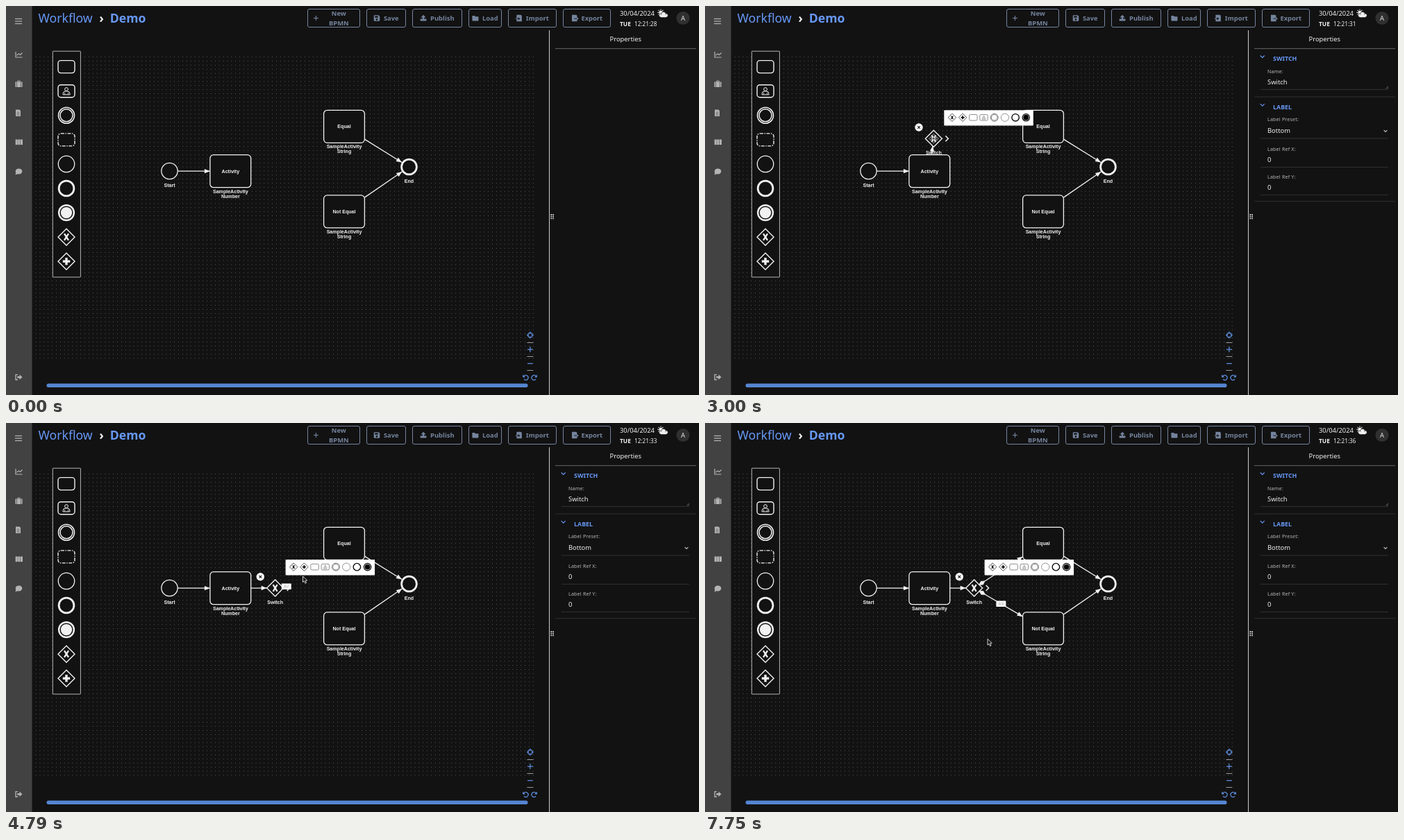
Recreate the animation shown at these times as an HTML page with a canvas. Size 998 by 561 pixels, loop 8000 ms.

```html
<!DOCTYPE html>
<html lang="en">
<head>
<meta charset="utf-8">
<title>Workflow editor</title>
<style>
html, body { margin: 0; width: 100%; height: 100%; overflow: hidden; background: #121212; }
canvas { display: block; }
</style>
</head>
<body>
<canvas id="stage" width="998" height="561"></canvas>
<script>
const W = 998, H = 561, LOOP = 8000, TURN = Math.PI * 2;
const BG = '#121212', INK = '#f1f1f1', BLUE = '#6798f5', SLATE = '#75849e', SIDE = '#b4b4b4', RAIL = '#424242';
const UI = '"Noto Sans", sans-serif', NODE = '"Liberation Sans", Arial, sans-serif';
const view = document.getElementById('stage').getContext('2d');
const backdrop = document.createElement('canvas');
backdrop.width = W;
backdrop.height = H;
let g = backdrop.getContext('2d');

// Drawing helpers
function paint(fill, stroke, width = 1) {
  if (fill) { g.fillStyle = fill; g.fill(); }
  if (stroke) { g.strokeStyle = stroke; g.lineWidth = width; g.stroke(); }
}
function trace(points, close) {
  g.beginPath();
  for (let i = 0; i < points.length; i += 2) g.lineTo(points[i], points[i + 1]);
  if (close) g.closePath();
}
function line(color, width, ...points) { trace(points); paint(null, color, width); }
function poly(fill, stroke, width, ...points) { trace(points, true); paint(fill, stroke, width); }
function circle(x, y, r, fill, stroke, width) {
  g.beginPath();
  g.arc(x, y, r, 0, TURN);
  paint(fill, stroke, width);
}
function box(x, y, w, h, r, fill, stroke, width) {
  g.beginPath();
  g.roundRect(x, y, w, h, r);
  paint(fill, stroke, width);
}
function boxAt(x, y, w, h, ...style) { box(x - w / 2, y - h / 2, w, h, ...style); }
function plus(x, y, r, color, width) {
  line(color, width, x - r, y, x + r, y);
  line(color, width, x, y - r, x, y + r);
}
function cross(x, y, rx, ry, color, width) {
  line(color, width, x - rx, y - ry, x + rx, y + ry);
  line(color, width, x + rx, y - ry, x - rx, y + ry);
}
function text(s, x, y, size, color, align = 'left', weight = 400, family = UI) {
  g.font = `${weight} ${size}px ${family}`;
  g.textAlign = align;
  g.fillStyle = color;
  g.fillText(s, x, y);
}
function at(x, y, draw, sx = 1, sy = sx, turn = 0) {
  g.save();
  g.translate(x, y);
  g.scale(sx, sy);
  g.rotate(turn);
  draw();
  g.restore();
}
const chevron = (x, y, color, r) => line(color, 1.2, x - r, y - r / 2, x, y + r / 2, x + r, y - r / 2);

// BPMN symbols, shared by the palette and the popover
const diamond = (ink, paper) => poly(paper, ink, 1.4, 0, -12, 12, 0, 0, 12, -12, 0);
const frame = (ink, paper) => boxAt(0, 0, 24, 18, 4, paper, ink, 1.4);
const ring = (r, width) => (ink, paper) => circle(0, 0, r, paper, ink, width);
const symbols = {
  task: frame,
  user(ink, paper) {
    frame(ink, paper);
    circle(0, -2.6, 2.4, null, ink, 1);
    box(-5, 0.2, 10, 5, [4, 4, 0, 0], null, ink, 1);
    for (const x of [-2.5, 2.5]) line(ink, 0.8, x, 5, x, 2.5);
  },
  middle(ink, paper) { ring(11.5, 1.6)(ink, paper); ring(9, 1.5)(ink); },
  group(ink, paper) { g.setLineDash([5, 1.5, 1.5, 1.5]); frame(ink, paper); g.setLineDash([]); },
  start: ring(11.7, 1.3),
  end: ring(10.9, 2.8),
  stop(ink, paper) { ring(10.9, 2.4)(ink, paper); circle(0, 0, 8.2, ink); },
  choice(ink, paper) { diamond(ink, paper); cross(0, 0, 3, 4.8, ink, 2.3); },
  both(ink, paper) { diamond(ink, paper); plus(0, 0, 5.2, ink, 3.4); }
};
const symbol = (kind, x, y, scale = 1, ink = INK, paper = BG) => at(x, y, () => symbols[kind](ink, paper), scale);

// Sidebar and header icons, drawn around their own centre
const sideIcons = [
  () => { line(SIDE, 1.2, -4.5, -4, -4.5, 4, 5, 4); line(SIDE, 1.2, -3, 1, 0, -1, 2, 0.5, 5, -2.5); },
  () => {
    boxAt(0, 1, 10, 7.6, 1, SIDE);
    boxAt(0, -2.6, 4, 3, 0.5, null, SIDE);
    for (const x of [-3, 3]) line(RAIL, 0.7, x, -3, x, 5);
  },
  () => { box(-4.5, -4.7, 7, 9.6, [0, 2.5, 0, 0], SIDE); for (const y of [-1, 1, 3]) line(RAIL, 0.6, -3, y, 1, y); },
  () => { for (const i of [-1, 0, 1]) at(0.3 + i * 3.6, 0, () => boxAt(0, 0, 3.1, 7.6, 0, SIDE), 1, 1, 0); },
  () => { at(0, 0, () => circle(0, 0, 4, SIDE), 1.2, 1); poly(SIDE, null, 0, -4, 1, -5, 5, 0, 3); }
];
const sheet = () => box(-3.5, -4.7, 7.5, 9.5, [0, 2, 0, 0], SLATE);
function sheetArrow(shift) {
  sheet();
  line(SLATE, 1.4, shift - 3, 0.7, shift + 1, 0.7);
  line(BG, 1, Math.max(shift - 3, -3.5), 0.7, Math.min(shift + 1, 3.5), 0.7);
  poly(shift > 0 ? SLATE : BG, null, 0, shift + 1, -1.5, shift + 3.3, 0.7, shift + 1, 2.9);
}
const buttonIcons = {
  New: () => plus(3.2, 0, 3.5, SLATE, 1.1),
  Save() {
    box(-4.2, -4.2, 8.5, 8.5, [1, 2.5, 1, 1], SLATE);
    box(-2.7, -3, 4.5, 2.3, 0, BG);
    circle(0, 1.9, 1.3, BG);
  },
  Publish() { boxAt(0, 2.5, 9, 3, 1, SLATE); boxAt(0, 0, 2.2, 4, 0, SLATE); poly(SLATE, null, 0, 0, -4.7, 3.5, -1, -3.5, -1); },
  Load() { box(-4.5, -3.5, 4, 3, 0.7, SLATE); box(-4.5, -2.3, 9, 6.3, 0.7, SLATE); },
  Import: () => sheetArrow(-2),
  Export: () => sheetArrow(3)
};

function drawSidebar() {
  g.fillStyle = RAIL;
  g.fillRect(0, 0, 37.5, H);
  for (const y of [18.5, 22, 25.5]) line(SIDE, 1.2, 13, y, 23, y);
  sideIcons.forEach((icon, i) => at(18.5, 70 + i * 42.1, icon));
  at(18.5, 535.3, () => {
    line(SIDE, 1.3, -1.5, -3.7, -4.5, -3.7, -4.5, 3.7, -1.5, 3.7);
    boxAt(-0.3, 0, 4, 2.6, 0, SIDE);
    poly(SIDE, null, 0, 1, -3.8, 5, 0, 1, 3.8);
  });
}

function drawHeader() {
  text('Workflow', 46.6, 24, 17.6, BLUE);
  text('›', 137.5, 24, 18, INK, 'center', 700);
  text('Demo', 149.8, 24, 17.6, BLUE, 'left', 700);
  const widths = { New: 75, Save: 56, Publish: 71, Load: 47, Import: 69, Export: 68 };
  let x = 434.5;
  for (const [label, w] of Object.entries(widths)) {
    const lines = label === 'New' ? ['New', 'BPMN'] : [label], mid = x + w / 2 + 7.3;
    box(x, 4.5, w, 26, 2.5, null, SLATE, 1);
    lines.forEach((s, i) => text(s, mid, 21 + (i * 2 + 1 - lines.length) * 7, 9.4, SLATE, 'center', 700));
    at(mid - g.measureText(lines.join(' ')).width / 2 - 10, 17.5, buttonIcons[label]);
    x += w + 10;
  }

  text('30/04/2024', 884, 14, 9.4, INK);
  text('TUE', 884, 29, 8.4, INK, 'left', 600);
  at(943, 9.3, () => {
    for (let i = 0; i < 8; i++) at(0, 0, () => line(INK, 1, 3, 0, 4.8, 0), 1, 1, i * TURN / 8);
    circle(0, 0, 2.6, INK);
    for (const i of [-1, 1, 0]) circle(3.9 + i * 3.5, 4.2 - (1 - i * i) * 1.7, 3.3 - i * i * 0.5, INK, BG, 0.6);
    boxAt(3.9, 5.2, 8, 3.6, 1, INK);
  });
  circle(975, 17.5, 9.6, '#303030');
  text('A', 975, 21, 9.4, '#e4e4e4', 'center');
}

function drawViewTools() {
  const tool = '#5c8ad8', x = 754.9;
  circle(x, 474.6, 3.3, null, tool, 1.3);
  for (let i = 0; i < 4; i++) at(x, 474.6, () => line(tool, 1.2, 1.8, 0, 5, 0), 1, 1, i * TURN / 4);
  for (let i = 0; i < 3; i++) line('#a8a8a8', 0.9, x - 4.5, 485.5 + i * 20, x + 4.5, 485.5 + i * 20);
  plus(x, 495.3, 4, tool, 1.3);
  line(tool, 1.3, x - 4, 515.6, x + 4, 515.6);
  for (const side of [-1, 1]) at(x - 0.4 + side * 5.9, 536, () => {
    g.beginPath();
    g.arc(0, 0, 3.4, -2.6, 2.4);
    paint(null, tool, 1.3);
    poly(tool, null, 0, -4.5, -4.5, -4.5, -0.6, -0.6, -0.6);
  }, -side, 1);
  box(58.5, 544.5, 693, 5.6, 2.8, '#5585d2');
}

function drawBackdrop() {
  g.fillStyle = BG;
  g.fillRect(0, 0, W, H);
  g.fillStyle = '#8c8c8c';
  for (let row = 0; row < 75; row++)
    for (let col = 0; col < 123; col++) g.fillRect(42.7 + col * 5.87, 73.2 + row * 5.87, 0.75, 0.75);
  drawSidebar();
  drawHeader();
  box(67.3, 65.2, 40.1, 325.8, 0.5, BG, '#b4b4b4', 1);
  ['task', 'user', 'middle', 'group', 'start', 'end', 'stop', 'choice', 'both']
    .forEach((kind, i) => symbol(kind, 87, 87.6 + i * 35.08));
  drawViewTools();
  line('#c4c4c4', 1.1, 782.5, 35, 782.5, H);
  for (let i = 0; i < 6; i++) boxAt(785.3 + i % 2 * 2.8, 301 + (i >> 1) * 2.7, 1.8, 1.8, 0.3, '#d0d0d0');
  text('Properties', 892.3, 51.3, 9.4, INK, 'center');
  line('#6e6e6e', 0.9, 791, 61.4, 994, 61.4);
}

// Properties panel
const rule = (x1, x2, y) => line('#343434', 0.9, x1, y, x2, y);
function caption(s, y) {
  g.letterSpacing = '0.22px';
  text(s, 810, y, 7.04, '#b9b9b9');
  g.letterSpacing = '0px';
}
function section(s, x, y) {
  chevron(x - 15.3, y - 6.3, BLUE, 3);
  text(s, x, y, 8.9, BLUE, 'left', 700);
}
function field(name, value, y, drop = 15.9) {
  caption(name, y);
  text(value, 810, y + drop, 9.4, INK);
  rule(800, 984, y + drop + 7.6);
}
function nameField(value) {
  section(value.toUpperCase(), 818, 79.3);
  field('Name:', value, 96.9);
  for (const r of [1.5, 3.5]) line('#aaa', 0.6, 984 - r, 119.3, 984, 119.3 - r);
}
const panels = {
  activity() {
    nameField('Activity');
    caption('Type:', 146.8);
    box(930.5, 135, 41, 18.4, 5, BLUE);
    plus(937.5, 144, 3, '#fff', 1);
    text('Select', 943, 147.2, 8.5, '#fff');
    text('SampleActivityNumber', 892.4, 168.2, 9.4, INK, 'center');
    text('Arguments:', 806.3, 191.6, 9.4, INK);
    box(802, 203, 181, 98.5, 0, null, '#8e8e8e', 1);
    section('Input Number', 836, 227.9);
    text('Use activity result variable', 818.4, 249.8, 8.2, '#c4c4c4');
    box(936, 238.5, 30, 17.6, 8.8, '#d5dae5');
    circle(946.7, 247.3, 5.8, '#646a75');
    text('1', 828, 275.4, 9.4, INK);
    rule(818, 974, 282.5);
    rule(811, 974, 294.5);
    field('Result Variable:', 'Result_Activity', 324.6);
    field('Result Type:', 'number', 374.1);
    rule(791, 994, 411.7);
  },
  switch() {
    nameField('Switch');
    rule(791, 994, 131);
    section('LABEL', 818, 149);
    field('Label Preset:', 'Bottom', 166.4, 17);
    chevron(980, 180.3, '#c4c4c4', 2.4);
    ['X', 'Y'].forEach((axis, i) => field(`Label Ref ${axis}:`, '0', 208.9 + i * 40));
    rule(791, 994, 281.7);
  }
};

// Diagram
const node = (kind, x, y, r) => ({ kind, x, y, r });
const startNode = node('circle', 235.5, 238, 12), endNode = node('circle', 580.5, 232, 12.3);
const activity = node('rect', 323.3, 238.2), equal = node('rect', 487, 173.8), unequal = node('rect', 487, 296.4);
const home = node('diamond', 387.6, 238);
const HALF_W = 29.4, HALF_H = 23.5;

const nodeText = (s, x, y) => text(s, x, y, 7.08, INK, 'center', 700, NODE);
function drawTask({ x, y }, name, type) {
  boxAt(x, y, HALF_W * 2, HALF_H * 2, 5, BG, INK, 1.3);
  nodeText(name, x, y + 2.4);
  nodeText('SampleActivity', x, y + 31.6);
  nodeText(type, x, y + 38.6);
}
function drawEvent(kind, { x, y }, name) {
  symbol(kind, x, y);
  nodeText(name, x, y + 23.2);
}
function edge(n, dx, dy) {
  const ax = Math.abs(dx), ay = Math.abs(dy);
  if (n.kind === 'rect') return Math.min(HALF_W / ax, HALF_H / ay);
  if (n.kind === 'diamond') return 12 / (ax + ay);
  return n.kind === 'circle' ? n.r / Math.hypot(dx, dy) : 0;
}
function link(a, b, operator) {
  const dx = b.x - a.x, dy = b.y - a.y, from = edge(a, dx, dy), to = 1 - edge(b, dx, dy);
  if (from >= to) return;
  const x1 = a.x + dx * from, y1 = a.y + dy * from, x2 = a.x + dx * to, y2 = a.y + dy * to;
  const angle = Math.atan2(dy, dx), mx = (x1 + x2) / 2, my = (y1 + y2) / 2;
  line(INK, 1.3, x1, y1, x2, y2);
  at(x2, y2, () => poly(INK, null, 0, 0, 0, -8, -3.2, -8, 3.2), 1, 1, angle);
  if (!operator) return;
  at(x1, y1, () => poly(INK, INK, 0.8, 0, 0, 4.7, -2.8, 9.4, 0, 4.7, 2.8), 1, 1, angle);
  boxAt(mx, my, 14, 8.4, 0.5, '#fff');
  text('==', mx, my + 2.3, 7, '#777', 'center', 400, NODE);
}
// The popover hangs off the node's top right corner.
function drawTools({ x, y }, halfW, halfH) {
  const closeX = x - halfW - 9.3, closeY = y - halfH - 4.2, nextX = x + halfW + 7;
  const left = x + halfW + (halfW > 12 ? -32.3 : 3), top = y - halfH - 29;
  circle(closeX, closeY, 5.7, '#fff');
  cross(closeX, closeY, 1.8, 1.8, '#222', 1.2);
  line(INK, 1.5, nextX - 2, y - 4, nextX + 2, y, nextX - 2, y + 4);
  box(left, top, 128.5, 22.4, 1, '#fff');
  ['choice', 'both', 'task', 'user', 'middle', 'start', 'end', 'stop'].forEach((kind, i) =>
    symbol(kind, left + 11.6 + i * 15.2, top + 10.6, 0.48, i < 2 || i > 5 ? '#000' : '#555', '#fff'));
}

// Each move eases the pointer from its last place to a spot near a node.
const move = (begin, end, n, dx, dy) => ({ begin, end, x: n.x + dx, y: n.y + dy });
const SHOW = 1080, PICK = 1750, ADD = 2920, DROP = 4130, CLEAR = 5560, REPICK = 6170;
const moves = [
  move(SHOW, 1480, activity, 28, 7),
  move(2000, 2080, activity, 21, -21),
  move(2290, 2700, activity, 8, -41),
  move(2880, ADD, activity, 6, -47),
  move(3210, 3700, home, 0, -6),
  move(3790, 3850, home, 0, 0),
  move(DROP, 4400, home, 18, 0),
  move(4630, 5060, equal, -12, 10),
  move(5330, 5540, unequal, -60, -9),
  move(5640, 6000, home, 0, 2),
  move(6200, 6450, home, 18, -1),
  move(6760, 7000, unequal, -63, -27),
  move(7000, 7350, unequal, -2, 4),
  move(7540, 7740, unequal, -80, 15)
];
function pointer(t) {
  let x = 690, y = 470;
  for (const m of moves) {
    const u = Math.min(1, Math.max(0, (t - m.begin) / (m.end - m.begin))), ease = u * u * (3 - 2 * u);
    x += (m.x - x) * ease;
    y += (m.y - y) * ease;
  }
  return { kind: 'point', x, y };
}
const inside = (p, n) => Math.abs(p.x - n.x) < HALF_W && Math.abs(p.y - n.y) < HALF_H;
const onGate = (p, n) => n && Math.abs(p.x - n.x) + Math.abs(p.y - n.y) < 12;

function drawPointer(p, grab) {
  at(p.x, p.y, () => {
    if (!grab) return poly('#111', '#fff', 0.8, 0, 0, 0, 8.7, 2, 7, 3.5, 10.3, 5, 9.6, 3.6, 6.4, 6.2, 6.2);
    for (let i = 0; i < 4; i++)
      at(0, 0, () => poly('#111', '#ddd', 0.7, -0.8, -1.5, -0.8, -4, -2.6, -4, 0, -7, 2.6, -4, 0.8, -4, 0.8, -1.5), 1, 1, i * TURN / 4);
    boxAt(0, 0, 2.6, 2.6, 0, '#111', '#ddd', 0.7);
  });
}

// A connection follows the pointer until it reaches its target.
function drawConnection(target, t, begin, release) {
  if (t < begin) return;
  const over = inside(pointer(t), target);
  link(home, t >= release || over ? target : pointer(t - 100), true);
  if (over && t < release) boxAt(target.x, target.y, HALF_W * 2 + 6, HALF_H * 2 + 6, 6, null, INK, 0.9);
}

function render(t) {
  const p = pointer(t);
  const gate = t < ADD ? null : t < DROP ? node('diamond', p.x, p.y) : home;
  const selected = t < PICK ? '' : t < ADD ? 'activity' : t < CLEAR || t >= REPICK ? 'switch' : '';

  g.drawImage(backdrop, 0, 0);
  text('12:21:' + (28 + Math.floor((t + 370) / 1000)), 905, 29, 8.2, INK, 'left', 500);
  drawEvent('start', startNode, 'Start');
  drawTask(activity, 'Activity', 'Number');
  drawTask(equal, 'Equal', 'String');
  drawTask(unequal, 'Not Equal', 'String');
  drawEvent('end', endNode, 'End');
  if (gate) {
    drawEvent('choice', gate, 'Switch');
    link(activity, gate);
    drawConnection(equal, t, 4660, 5080);
    drawConnection(unequal, t, 6780, 7540);
  }
  link(startNode, activity);
  link(equal, endNode);
  link(unequal, endNode);

  if (t >= 3680 && t < DROP) {
    g.setLineDash([1.8, 0.8]);
    line('#4c7fdc', 1, 42, gate.y + 0.3, 768, gate.y + 0.3);
    g.setLineDash([]);
  }
  if (selected) {
    if (selected === 'switch') drawTools(gate, 12, 12);
    else drawTools(activity, HALF_W, HALF_H);
    panels[selected]();
  }
  if (t >= SHOW) drawPointer(p, inside(p, activity) || onGate(p, gate));
}

drawBackdrop();
g = view;
const origin = performance.now();
function tick() {
  render((performance.now() - origin) % LOOP);
  requestAnimationFrame(tick);
}
tick();
</script>
</body>
</html>
```
